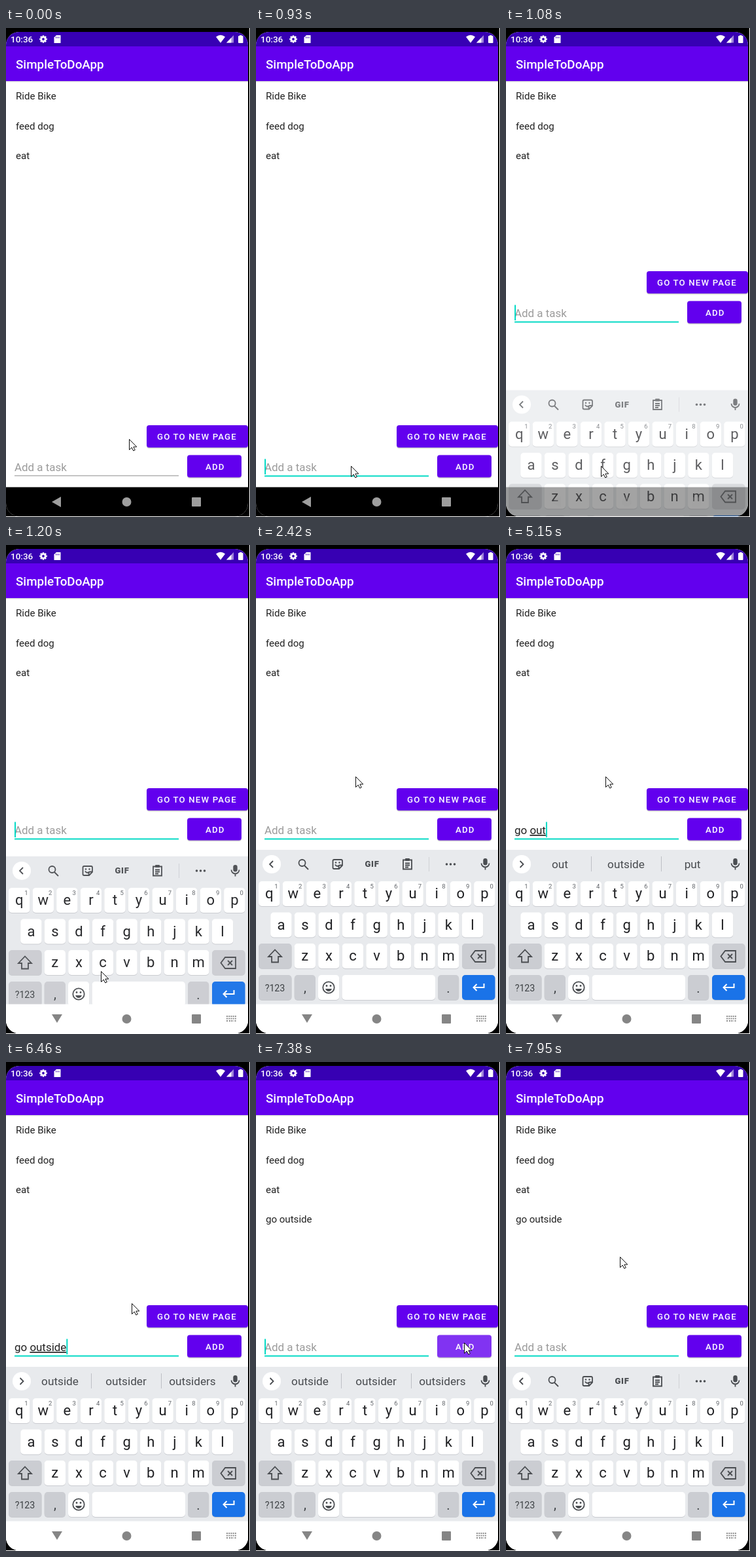
Recreate the animation shown at these times as an HTML page. Size 373x746 px, loop 8000 ms.

```html
<!DOCTYPE html>
<html lang="en">
<head>
<meta charset="utf-8">
<title>To-do list</title>
<style>
html, body { margin: 0; width: 100%; height: 100%; overflow: hidden; background: #fff; }
svg { display: block; width: 373px; height: 746px; font-family: Roboto, sans-serif; }
text { white-space: pre; }
.line { fill: none; stroke: #4a4d51; stroke-width: 1.8; }
.word { text-decoration: underline; text-decoration-skip-ink: none; }
.button { font-weight: 500; letter-spacing: 1.18px; }
</style>
</head>
<body>
<svg id="stage" viewBox="0 0 373 746"></svg>
<script>
const LOOP = 8000, TEAL = '#03dac5', PURPLE = '#6200ee', INK = '#4a4d51';
const stage = document.getElementById('stage');

const rect = (x, y, w, h, fill, r = 0, more = '') =>
  `<rect x="${x}" y="${y}" width="${w}" height="${h}" fill="${fill}" rx="${r}" ${more}/>`;
const dot = (x, y, r, fill) => `<circle cx="${x}" cy="${y}" r="${r}" fill="${fill}"/>`;
const path = (d, more = 'class="line"') => `<path d="${d}" ${more}/>`;
const text = (x, y, size, fill, s, more = '') =>
  `<text x="${x}" y="${y}" font-size="${size}" fill="${fill}" ${more}>${s}</text>`;
const centred = (x, y, size, fill, s, more = '') =>
  text(x, y, size, fill, s, 'text-anchor="middle" ' + more);

const key = (x, y, w, fill = '#fff') =>
  rect(x, y + 1, w, 38, '#c9cbd0', 5) + rect(x, y, w, 38, fill, 5);
const keyRow = (letters, x0, y) => [...letters].map((c, i) => {
  const x = x0 + i * 36.57;
  return key(x - 16.2, y, 32.4) + centred(x, y + 26, 22, '#202124', c);
}).join('');

const button = (x, y, w, label, tx) =>
  rect(x, y + 1.5, w, 34, '#0003', 4) + rect(x, y, w, 34, PURPLE, 4) +
  text(tx, y + 22, 13.2, '#fff', label, 'class="button"');

const gear = [0, 45, 90, 135].map(a =>
  rect(55.7, 11.2, 2.6, 11.6, '#fff', .5, `transform="rotate(${a} 57 17)"`)).join('');

const statusBar = rect(0, 6, 370, 22, '#3700b3') +
  text(7, 22, 13.5, '#fff', '10:36', 'font-weight="500"') +
  gear + dot(57, 17, 4.4, '#fff') + dot(57, 17, 1.9, '#3700b3') +
  path('M77 11h6.5v12h-10v-8.5z', 'fill="#fff"') +
  path('M76.5 13.5v2M78.8 13.5v2M81 13.5v2', 'stroke="#3700b3"') +
  path('M321 13.5Q328 8 335 13.5L328 22.7z', 'fill="#fff"') +
  path('M337 22.5h11v-11.5z', 'fill="#fff8"') + path('M337 22.5h7.5v-7.8z', 'fill="#fff"') +
  rect(355, 12, 7.5, 11, '#fff', 1) + rect(357, 11, 3.5, 2, '#fff');

const appBar = rect(0, 81, 370, 1.5, '#0002') + rect(0, 28, 370, 53, PURPLE) +
  text(15, 62, 18.84, '#fff', 'SimpleToDoApp', 'font-weight="500"');

const list = ['Ride Bike', 'feed dog', 'eat', 'go outside'].map((s, i) =>
  text(15, 109.3 + i * 45.2, 15.07, '#212121', s, i == 3 ? 'id="added"' : '')).join('');

const form = `<g id="form">
  ${button(215, 371, 155, 'GO TO NEW PAGE', 231)}
  ${button(277, 416.5, 83, 'ADD', 305)}
  ${rect(277, 416.5, 83, 34, '#fff3', 4, 'id="press"')}
  ${rect(13, 447.5, 251, 1, '#8b8b8b', 0, 'id="rule"')}
  ${text(13, 441, 16.96, '#9b9b9b', 'Add a task', 'id="hint"')}
  ${text(13, 441, 16.96, '#212121', '<tspan id="before"></tspan><tspan id="word" class="word"></tspan><tspan id="after"></tspan>', 'id="field"')}
  ${rect(13, 422.5, 2, 23.5, TEAL, 0, 'id="caret"')}
</g>`;

const tools = `<g id="tools">
  ${path('M26 482l-5 5 5 5')}
  <circle cx="70.5" cy="485" r="5" class="line"/>${path('M74 489l6 6')}
  ${path('M119.500 480h10.500q2 0 2 2v7l-5 5h-7.500q-2 0-2-2v-10q0-2 2-2zM132 488.500h-3.500q-2 0-2 2v3.500M121 487.500q2.500 4 5.500 1.500')}
  ${dot(122, 484.5, 1.2, INK)}${dot(127.5, 484.5, 1.2, INK)}
  ${centred(177.5, 491, 13, INK, 'GIF', 'font-weight="900" letter-spacing=".7"')}
  ${path('M225 480.500h13v14h-13zM228 485.500h7M228 488.500h7M228 491.500h5')}
  ${rect(228, 478, 7, 4, INK, 1)}${rect(264, 476, 1, 22, '#d0d2d6')}
  ${[291.5, 297.5, 303.5].map(x => dot(x, 487, 1.8, INK)).join('')}
</g>`;

const hints = `<g id="hints">
  ${path('M21.500 482l5 5-5 5')}
  ${rect(130, 475, 1, 23, '#bdc0c5')}${rect(237, 475, 1, 23, '#bdc0c5')}
  ${[82.5, 183.5, 285].map(x => centred(x, 493, 17.2, '#484b4f', '', 'class="hint"')).join('')}
</g>`;

const keyboard = `<g id="keyboard">
  ${rect(0, 465, 370, 281, '#e8eaed')}${dot(24, 487, 14, '#fff')}
  ${tools}${hints}
  ${rect(347.3, 478, 6.4, 10.5, INK, 3.2)}${path('M344.500 485.500a6 6 0 0 0 12 0M350.500 491.500v4')}
  ${keyRow('qwertyuiop', 20.2, 513)}
  ${[...'1234567890'].map((c, i) => centred(31 + i * 36.57, 523.5, 9.5, '#5f6368', c)).join('')}
  ${keyRow('asdfghjkl', 38.4, 560.5)}
  ${key(4, 608, 50.5, '#cbcdd2')}${keyRow('zxcvbnm', 74.8, 608)}${key(315, 608, 50.5, '#cbcdd2')}
  ${path('M29 617.500L39 628h-5v8.500h-10V628h-5z')}
  ${path('M335 619h16v17h-16l-6.500-8.500zM339 624l7 7M346 624l-7 7')}
  ${key(4, 656, 50.5, '#cbcdd2')}${key(58.7, 656, 32.2, '#cbcdd2')}${key(95, 656, 32.2)}
  ${key(131.5, 656, 142.5)}${key(278, 656, 32.2, '#cbcdd2')}${key(315, 656, 50.5, '#1a73e8')}
  ${centred(29, 681, 14.2, '#3c4043', '?123')}
  ${centred(75, 682, 20, '#3c4043', ',')}${centred(294, 683, 20, '#3c4043', '.')}
  <circle cx="111" cy="675" r="8.700" class="line"/>
  ${dot(108, 672.5, 1.4, INK)}${dot(114, 672.5, 1.4, INK)}
  ${path('M106 677h10q-1.500 4-5 4t-5-4z', `fill="${INK}"`)}
  ${path('M348.500 669v6h-16M337.500 670l-5 5 5 5', 'fill="none" stroke="#fff" stroke-width="2"')}
</g>`;

const navBar = `<g>
  ${rect(0, 700.5, 370, 45, '#000', 0, 'id="navBack"')}
  <g id="navIcons">
    <path id="back"/><circle cx="184.500" cy="723" r="7"/>
    <rect x="284" y="716" width="14" height="14" rx="1"/>
  </g>
  ${path('M337 719h15M337 722.500h15M337 726h2.500M341 726h7M349.500 726h2.500', 'id="keyIcon" stroke="#8c8c8c" stroke-width="2" stroke-dasharray="2 1.200"')}
</g>`;

stage.innerHTML = `<clipPath id="screen">${rect(0, 6, 370, 739, '#000', 20)}</clipPath>
  ${rect(0, 0, 372, 745, '#000')}
  <g clip-path="url(#screen)">${rect(0, 6, 370, 739, '#fff')}
  ${statusBar}${appBar}${list}${form}${keyboard}${navBar}</g>
  ${path('M.5 .5v16l3.700-3.500 2.600 5 2.500-1.200-2.500-4.800h5z', 'id="mouse" fill="#fff" stroke="#111"')}`;

// time, x, y
const mouseSteps = [
  [0, 188, 627], [120, 184, 632], [260, 169, 648], [400, 154, 662], [540, 145, 668],
  [1200, 145, 650], [1340, 147, 585], [1480, 149, 500], [1630, 151, 425],
  [1770, 152, 375], [1910, 152, 353],
  [6460, 192, 368], [6590, 243, 392], [6710, 290, 415], [6840, 313, 426], [6960, 318, 428],
  [7520, 298, 405], [7660, 245, 355], [7810, 190, 310], [7950, 174, 297]];

// time, settled text, word being typed, trailing text, suggestions
const typing = [
  [0, '', '', '', ''],
  [3500, '', 'g', '', 'g go get'],
  [3620, '', 'go', '', 'go good got'],
  [3740, '', 'go', ' ', 'go good got'],
  [4040, 'go ', '', '', 'to out home'],
  [4320, 'go ', 'o', '', 'on out outside'],
  [4470, 'go ', 'ou', '', 'ou out outside'],
  [5150, 'go ', 'out', '', 'out outside put'],
  [5430, 'go ', 'outs', '', 'outs outside puts'],
  [5570, 'go ', 'outsi', '', 'outsi outside outsider'],
  [5710, 'go ', 'outsid', '', 'outsid outside outsider'],
  [5860, 'go ', 'outside', '', 'outside outsider outsiders'],
  [7380, '', '', '', 'outside outsider outsiders'],
  [7520, '', '', '', '']];

const caretOff = [[0, 670], [1480, 1910], [2420, 2850], [3380, 3500], [5030, 5150], [6590, 7090], [7950, LOOP]];
// time, drop, opacity
const slide = [[0, 290, 0], [1080, 87.5, .72], [1200, 10, .96], [1340, 0, 1]];

const $ = id => document.getElementById(id);
const set = (id, attrs) => { for (const k in attrs) $(id).setAttribute(k, attrs[k]); };
const show = (id, on) => set(id, { visibility: on ? 'visible' : 'hidden' });
const at = (steps, t) => steps.findLast(s => s[0] <= t);

function draw(t) {
  const [, mx, my] = at(mouseSteps, t);
  set('mouse', { transform: `translate(${mx} ${my})` });

  const focused = t >= 670, open = t >= 1080, settled = t >= 1200;
  const [, drop, opacity] = at(slide, t);
  set('keyboard', { transform: `translate(0 ${drop})`, opacity });
  set('form', { transform: `translate(0 ${open ? 0 : 235})` });
  set('rule', { fill: focused ? TEAL : '#8b8b8b', height: focused ? 2 : 1 });

  set('navBack', { fill: settled ? '#fff' : '#000', opacity: open && !settled ? .36 : 1 });
  set('navIcons', { fill: settled ? '#858585' : '#9e9e9e', opacity: open && !settled ? .3 : 1 });
  set('back', { d: settled ? 'M70 716h16l-8 13z' : 'M70 723l14-8v16z' });
  show('keyIcon', settled);

  const [, before, word, after, words] = at(typing, t);
  $('before').textContent = before;
  $('word').textContent = word;
  $('after').textContent = after;
  show('hint', !(before + word));
  const width = before + word ? $('field').getComputedTextLength() : 0;
  set('caret', { x: 13 + width });
  show('caret', !caretOff.some(([a, b]) => t >= a && t < b));

  show('tools', !words);
  show('hints', words);
  const parts = words.split(' ');
  stage.querySelectorAll('.hint').forEach((e, i) => e.textContent = parts[i] || '');

  show('added', t >= 7380);
  show('press', t >= 7380 && t < 7660);
}

function tick() {
  draw(performance.now() % LOOP);
  requestAnimationFrame(tick);
}
tick();
</script>
</body>
</html>
```
